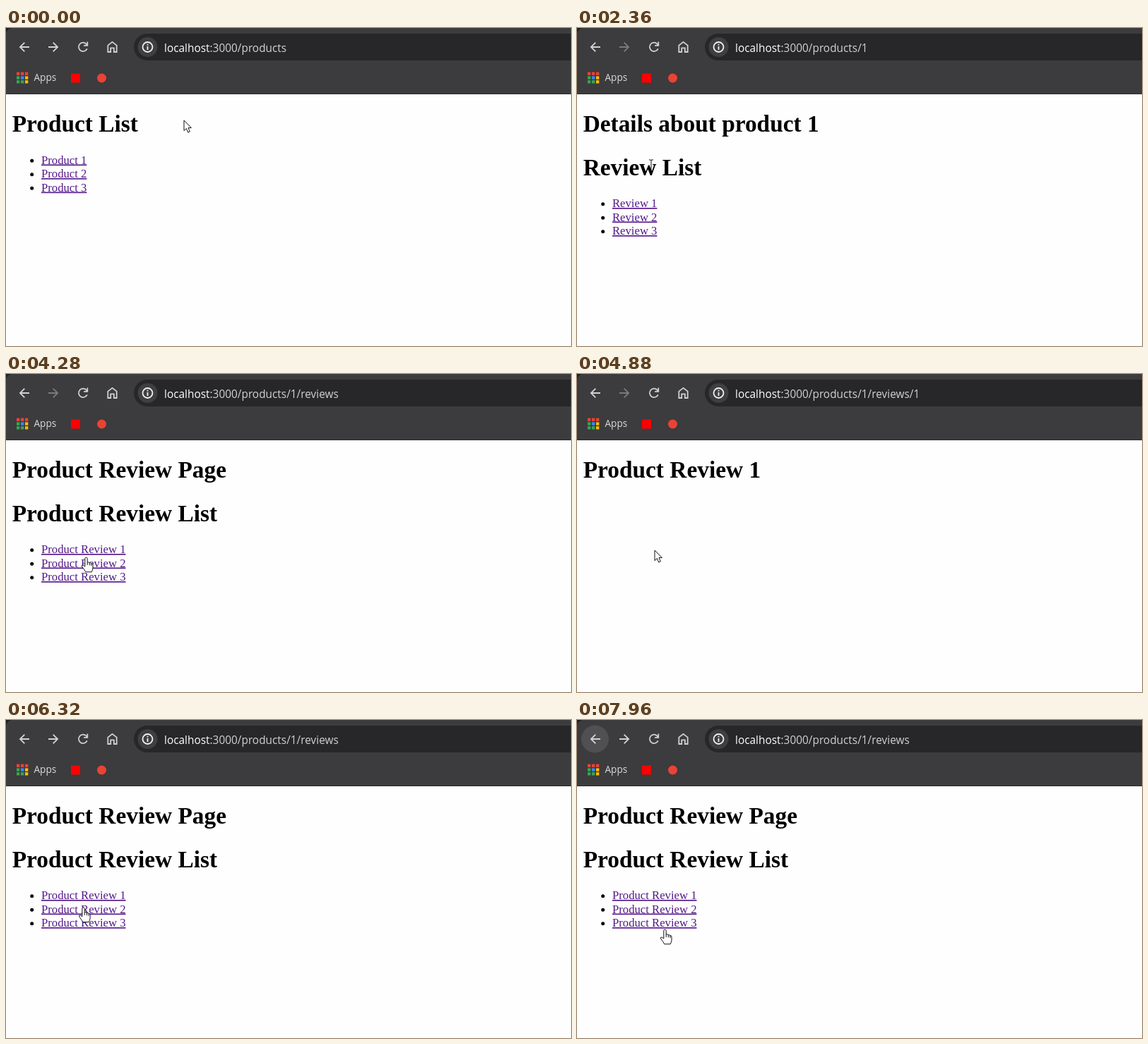
Write an HTML page that moves like this. It is 800x451 px and loops after 8 s.

```html
<!DOCTYPE html>
<html lang="en">
<head>
<meta charset="utf-8">
<title>Product List</title>
<style>
  html, body { margin: 0; width: 100%; height: 100%; overflow: hidden; background: #fefefe; }
  svg { display: block; width: 100%; height: 100%; }
  text { white-space: pre; }
  .ui { font-family: "Open Sans", "Noto Sans", sans-serif; }
  .h1 { font: bold 33.36px "Liberation Serif", "Times New Roman", serif; }
  .link { font: 16.68px "Liberation Serif", "Times New Roman", serif; fill: #551a8b; text-decoration: underline; }
  .icon { fill: none; stroke: #d2d1d2; stroke-width: 1.8; }
</style>
</head>
<body>
<svg viewBox="0 0 800 451" preserveAspectRatio="none">
  <rect width="800" height="451" fill="#fefefe"/>
  <rect width="800" height="94" fill="#3c3b3d"/>
  <path d="M0 0H8Q1 1 0 8Z" fill="#1f1f20"/>
  <rect y="93" width="800" height="1" fill="#2c2b2d"/>
  <rect x="181" y="8" width="640" height="38" rx="19" fill="#272628"/>

  <circle id="backHover" cx="25.5" cy="27" r="19.5" fill="#504f51"/>
  <rect id="appsHover" x="7" y="54" width="72" height="33" rx="16.5" fill="#4a494b"/>

  <path class="icon" d="M33 27H20M26.3 20.6L19.9 27L26.3 33.4"/>
  <path class="icon" id="forward" d="M60 27H73M66.7 20.6L73.1 27L66.7 33.4"/>
  <path class="icon" d="M114.8 29.3A6.2 6.2 0 1 1 113.6 22.6L115 24.2M115.3 19.6V24.8H110.1"/>
  <path class="icon" d="M144.3 24.6L150.5 19.8L156.7 24.6V34H152.8V28.4H148.2V34H144.3Z"/>

  <circle cx="200.5" cy="27" r="14" fill="#3f3e40"/>
  <circle class="icon" cx="200.5" cy="27" r="7" style="stroke:#f0f0f0"/>
  <path d="M200.5 26V31M200.5 22.8V24.6" stroke="#f0f0f0" stroke-width="1.8"/>
  <text class="ui" x="224" y="33.8" font-size="15.4" fill="#d2d1d3"><tspan fill="#fff">localhost</tspan><tspan id="path"></tspan></text>

  <g id="grid"></g>
  <text class="ui" x="39.5" y="75.2" font-size="13.6" fill="#dcdbdc">Apps</text>
  <rect x="92" y="64.5" width="13" height="13" fill="#f00"/>
  <circle cx="135.5" cy="71" r="6.5" fill="#ea4335"/>

  <g id="page"></g>

  <g id="cursor" stroke="#111" fill="#fff" stroke-linejoin="round">
    <path id="arrow" d="M0 0V14.6L3.4 11.5L5.7 17L8.3 15.9L6 10.6H10.4Z"/>
    <path id="hand" d="M-1.7 1.6Q-1.6 .2 0 .2Q1.6 .2 1.7 1.6V7.2Q3.7 6 4.8 7.9Q6.6 7 7.4 8.8Q9.3 8.2 9.5 10.5V15Q9.4 17.6 7.7 20.8H-.9Q-2.2 17.6 -4.6 15Q-6.6 12.5 -6 11.5Q-4.6 9.9 -1.7 13ZM1.7 7.2V11M4.8 7.9V11.4M7.4 8.8V12"/>
    <path id="beam" fill="none" d="M-3 -8H-1Q0 -8 0 -7Q0 -8 1 -8H3M0 -7V7M-3 8H-1Q0 8 0 7Q0 8 1 8H3"/>
  </g>
</svg>
<script>
const LOOP = 8000, STEP = 40;
const $ = id => document.getElementById(id);

const list = { path: "", heads: ["Product List"], item: "Product" };
const details = { path: "/1", heads: ["Details about product 1", "Review List"], item: "Review" };
const reviews = { path: "/1/reviews", heads: ["Product Review Page", "Product Review List"], item: "Product Review" };
const review = n => ({ path: "/1/reviews/" + n, heads: ["Product Review " + n] });

// Visits in order; back: reached with the back button
const visits = [
  { at: 0, page: list, forward: true },
  { at: 2080, page: details },
  { at: 3800, page: reviews },
  { at: 4840, page: review(1) },
  { at: 5800, page: reviews, forward: true, back: true },
  { at: 6520, page: review(2) },
  { at: 7520, page: reviews, forward: true, back: true }
];

// Pointer stops: time, x, y
const stops = [
  [0, 252, 131], [120, 252, 131], [800, 262, 319], [1040, 283, 322],
  [1260, 328, 396], [1920, 106, 190], [2120, 106, 190], [2360, 105, 195],
  [2800, 292, 232], [3560, 112, 250], [3840, 112, 250], [4280, 113.5, 260],
  [4600, 110, 250], [4920, 110, 250], [5500, 25, 32], [5600, 23.5, 27],
  [5860, 23.5, 27], [6340, 110, 267], [6580, 110, 267], [7120, 34, 46],
  [7260, 25, 28], [7600, 25, 28], [7960, 124.5, 297], [LOOP, 124.5, 297]
];

const colors = { r: "#ea4335", g: "#34a853", b: "#4285f4", y: "#fbbc04" };
$("grid").innerHTML = [..."rrrgbyggy"].map((c, i) =>
  `<rect x="${15 + i % 3 * 6}" y="${62.6 + Math.floor(i / 3) * 5.8}" width="4.3" height="4.3" fill="${colors[c]}"/>`).join("");

function pageMarkup({ heads, item }) {
  const titles = heads.map((s, i) => `<text class="h1" x="8.7" y="${147 + i * 61.5}">${s}</text>`);
  const top = 131 + heads.length * 61.5;
  const items = item ? [1, 2, 3].map(n => {
    const y = top + (n - 1) * 19.5;
    return `<circle cx="36.7" cy="${y - 4.2}" r="2.5"/><text class="link" x="50" y="${y}">${item} ${n}</text>`;
  }) : [];
  return titles.concat(items).join("");
}

function pointer(t) {
  const i = Math.max(1, stops.findIndex(s => s[0] >= t));
  const [t0, x0, y0] = stops[i - 1], [t1, x1, y1] = stops[i];
  const u = Math.max(0, (t - t0) / (t1 - t0)), e = u * u * (3 - 2 * u);
  return [x0 + (x1 - x0) * e, y0 + (y1 - y0) * e];
}

function cursorShape(x, y) {
  for (const el of $("page").querySelectorAll("text")) {
    const b = el.getBBox(), pad = 1;
    if (x >= b.x && x <= b.x + b.width && y >= b.y - pad && y <= b.y + b.height + pad)
      return el.classList.contains("link") ? "hand" : "beam";
  }
  return "arrow";
}

const show = (id, on) => $(id).setAttribute("visibility", on ? "visible" : "hidden");
let current;

function render(t) {
  const visit = visits.filter(v => v.at <= t).pop();
  if (visit !== current) {
    current = visit;
    $("page").innerHTML = pageMarkup(visit.page);
    $("path").textContent = ":3000/products" + visit.page.path;
    $("forward").style.stroke = visit.forward ? "" : "#7b7a7b";
  }

  const [x, y] = pointer(t);
  $("cursor").setAttribute("transform", `translate(${x.toFixed(1)} ${y.toFixed(1)})`);
  const shape = cursorShape(x, y);
  for (const id of ["arrow", "hand", "beam"]) show(id, id === shape);

  // Toolbar hover trails the pointer and sticks while going back
  const [hx, hy] = pointer(Math.max(0, t - 80));
  show("backHover", Math.hypot(hx - 25.5, hy - 27) < 19.5 || visit.back && t - visit.at < 480);
  show("appsHover", hx > 7 && hx < 79 && hy > 54 && hy < 87);
}

const start = performance.now();
function tick() {
  const t = (performance.now() - start) % LOOP;
  render(Math.floor(t / STEP) * STEP);
  requestAnimationFrame(tick);
}
tick();
</script>
</body>
</html>
```
